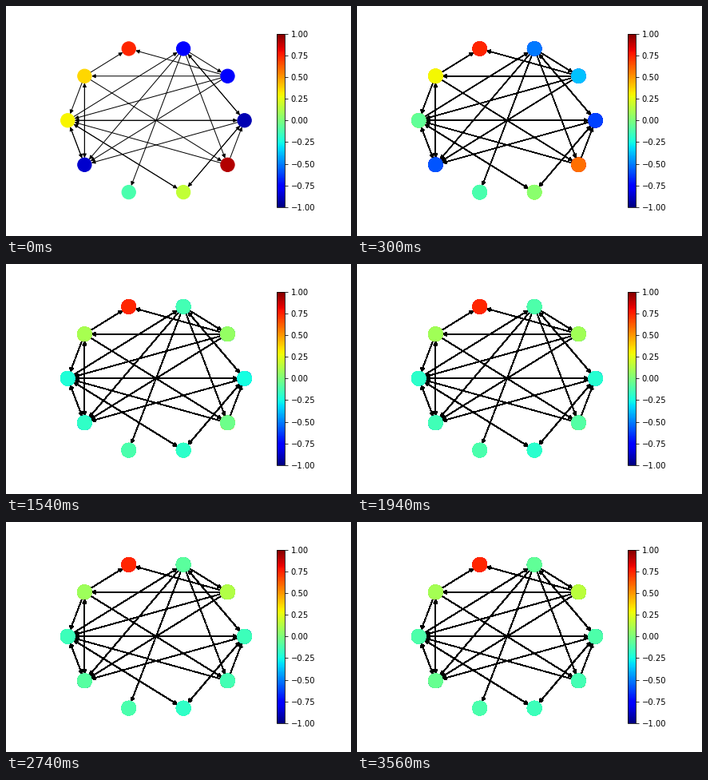
A matplotlib script for the animation above (3.58 s loop, 432 by 288 pixels).

```python
from itertools import product

import numpy as np
import matplotlib.pyplot as plt
from matplotlib.animation import FuncAnimation
from matplotlib.patches import FancyArrowPatch

W, H, DPI = 432, 288, 72
FRAMES, STEP_MS = 179, 20
DT = 0.01
N = 10
NODE_SIZE = 300

# Every node of the first group points at every other node of the second.
GROUPS = [
    ({0, 5}, {0, 2, 5, 6, 8}),
    ({8, 9}, {0, 5}),
    ({1, 4}, {3, 5, 6}),
    ({1, 6}, {4, 5}),
    ({2, 4}, {6, 9}),
    ({2}, {0, 1, 7}),
]
LINKS = sorted({(a, b) for src, dst in GROUPS for a, b in product(src, dst) if a != b})
START = np.array([-0.91, -0.78, -0.78, 0.74, 0.36, 0.30, -0.86, -0.12, 0.17, 0.91])


def simulate():
    """Consensus: each node drifts towards the nodes it points at."""
    adj = np.zeros((N, N))
    for a, b in LINKS:
        adj[a, b] = 1
    laplacian = np.diag(adj.sum(axis=1)) - adj
    states = [START]
    for _ in range(FRAMES - 1):
        states.append(states[-1] - DT * laplacian @ states[-1])
    return np.array(states)


def add_arrow(ax, start, end):
    shrink = np.sqrt(NODE_SIZE) / 2
    return ax.add_patch(FancyArrowPatch(
        start, end, arrowstyle="-|>", mutation_scale=10, shrinkA=shrink,
        shrinkB=shrink, lw=1, color="black", zorder=1))


def arrow_layers(fig, ax, pos):
    """Render the arrows once, then darken them as if drawn again each frame."""
    arrows = [add_arrow(ax, pos[a], pos[b]) for a, b in LINKS]
    fig.canvas.draw()
    shade = np.array(fig.canvas.buffer_rgba())[..., 0]
    for arrow in arrows:
        arrow.remove()
    light = np.minimum(shade + 1.0, 255) / 255
    layers = [shade]
    for _ in range(FRAMES - 1):
        # The renderer rounds down on every repaint.
        layers.append(np.floor(layers[-1] * light + 1e-6).astype(np.uint8))
    return layers


def as_rgb(grey):
    return np.repeat(grey[..., None], 3, axis=2)


fig = plt.figure(figsize=(W / DPI, H / DPI), dpi=DPI, facecolor="white")
ax = fig.add_axes([0.125, 0.125, 0.62, 0.755])
ax.axis("off")
angle = np.arange(N) * 2 * np.pi / N
pos = np.column_stack([np.cos(angle), np.sin(angle)])
reach = 1.21 * pos.max(axis=0)
ax.set_xlim(-reach[0], reach[0])
ax.set_ylim(-reach[1], reach[1])

layers = arrow_layers(fig, ax, pos)
edges = fig.figimage(as_rgb(layers[0]), origin="upper", zorder=-1)

states = simulate()
nodes = ax.scatter(pos[:, 0], pos[:, 1], s=NODE_SIZE, c=states[0], cmap="jet",
                   vmin=-1, vmax=1, linewidths=1, zorder=2)

cax = fig.add_axes([0.78375, 0.125, 0.755 * H / 20 / W, 0.755])
bar = fig.colorbar(nodes, cax=cax, ticks=np.linspace(-1, 1, 9))
bar.ax.tick_params(labelsize=10)


def draw(n):
    edges.set_data(as_rgb(layers[n]))
    # Nodes pile up too, the newest on top.
    nodes.set_offsets(np.tile(pos, (n + 1, 1)))
    nodes.set_array(states[:n + 1].ravel())
    return edges, nodes


anim = FuncAnimation(fig, draw, frames=FRAMES, interval=STEP_MS,
                     init_func=lambda: draw(0), repeat=True, blit=False)
plt.show()
```
